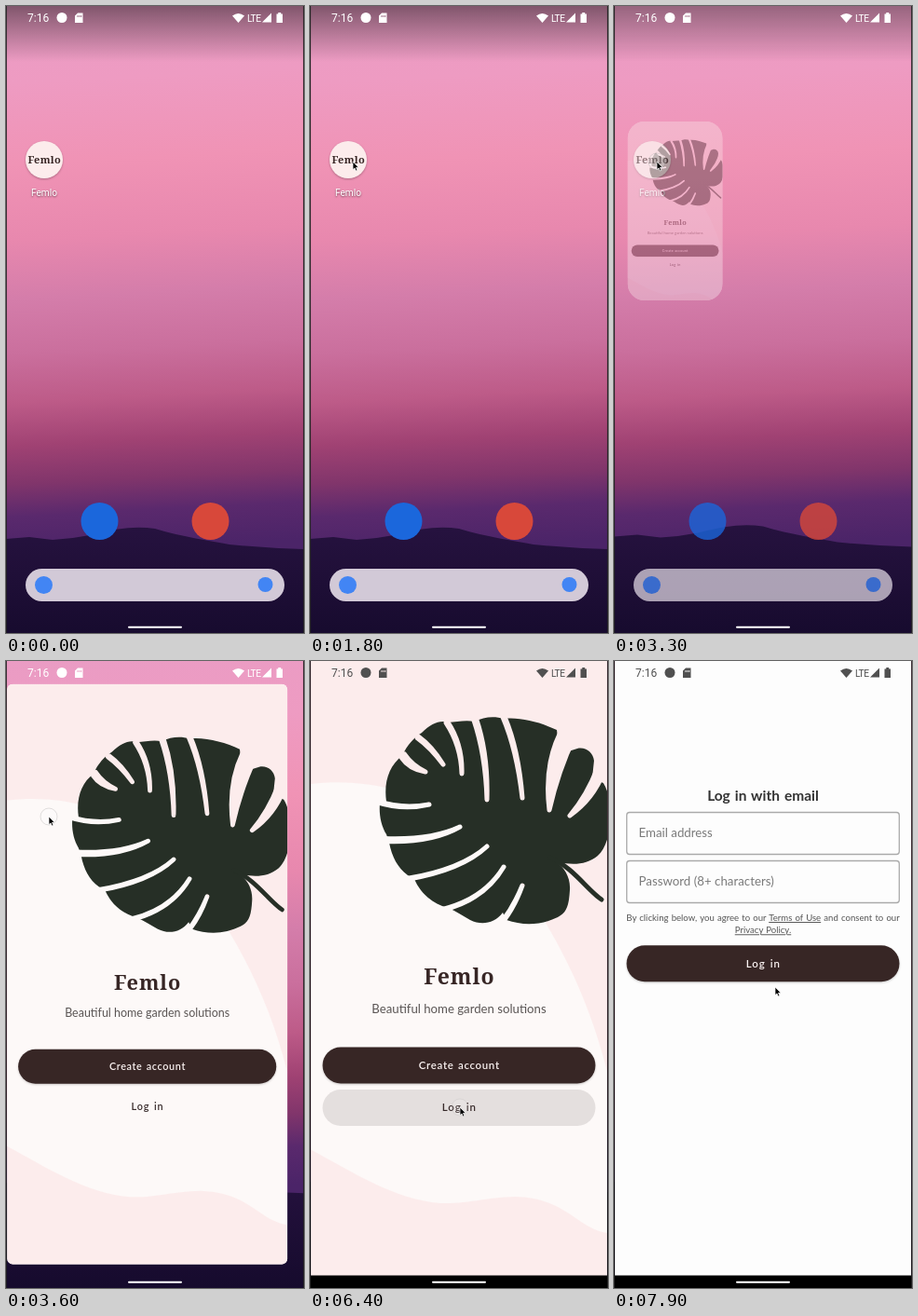
Animation, 320 px wide and 673 px high, one loop 8 s. Source, as an HTML page:

```html
<!DOCTYPE html>
<html lang="en">
<head>
<meta charset="utf-8">
<title>Garden app sign-in</title>
<style>
html, body { margin: 0; width: 100%; height: 100%; overflow: hidden; background: #000; }
svg { display: block; width: 100vw; height: 100vh; }
text { font-family: Lato, "Open Sans", sans-serif; }
.mid { text-anchor: middle; }
.brand { font-family: "Noto Serif", serif; font-weight: 600; fill: #372625; }
.sys { font-family: Roboto, sans-serif; }
.btn { fill: #372625; filter: drop-shadow(0 1px 1px #0003); }
.action { font-size: 11.5px; font-weight: 600; word-spacing: 1px; }
.light { fill: #fbf3f2; }
.field { fill: none; stroke: #aaa; stroke-width: 1.3; }
.hint { font-size: 13.3px; fill: #7a7a7a; }
.legal { font-size: 9.6px; fill: #555; word-spacing: .7px; }
.legal tspan { text-decoration: underline; }
</style>
</head>
<body>
<svg viewBox="0 0 320 673">
  <defs>
    <linearGradient id="sky" gradientUnits="userSpaceOnUse" x1="150" y1="0" x2="180" y2="580">
      <stop offset="0" stop-color="#ea9cc4"/>
      <stop offset=".13" stop-color="#ee9bc2"/>
      <stop offset=".28" stop-color="#f093b5"/>
      <stop offset=".42" stop-color="#e888ae"/>
      <stop offset=".53" stop-color="#d47daa"/>
      <stop offset=".63" stop-color="#ca6f9d"/>
      <stop offset=".72" stop-color="#bd5b88"/>
      <stop offset=".8" stop-color="#a04273"/>
      <stop offset=".87" stop-color="#81356b"/>
      <stop offset=".93" stop-color="#5a296d"/>
      <stop offset="1" stop-color="#4b2468"/>
    </linearGradient>
    <linearGradient id="hill" x1="0" y1="0" x2="0" y2="1">
      <stop offset="0" stop-color="#26123f"/>
      <stop offset="1" stop-color="#150a2c"/>
    </linearGradient>
    <linearGradient id="shade" x1="0" y1="0" x2="0" y2="1">
      <stop offset="0" stop-opacity=".45"/>
      <stop offset="1" stop-opacity="0"/>
    </linearGradient>
    <clipPath id="windowClip"><rect id="windowRect" x="1" y="0" width="318" height="660"/></clipPath>
    <clipPath id="pill"><rect x="13.5" y="460" width="293" height="39" rx="19.5"/></clipPath>
    <mask id="cuts" maskUnits="userSpaceOnUse" x="60" y="40" width="270" height="260">
      <rect x="60" y="40" width="270" height="260" fill="#fff"/>
      <path id="slits" stroke="#000" stroke-width="5" stroke-linejoin="round"/>
    </mask>
  </defs>

  <g id="wallpaper">
    <rect width="320" height="673" fill="url(#sky)"/>
    <path fill="url(#hill)" d="M0 572L25 570 50 573Q70 572 90 568C120 560 140 558 160 561C190 570 220 574 240 578Q280 582 320 583V690H0Z"/>
  </g>

  <g id="home">
    <rect width="320" height="60" fill="url(#shade)"/>
    <circle cx="41" cy="165" r="20" fill="#fcecec" style="filter:drop-shadow(0 1px 1px #0004)"/>
    <text class="brand mid" x="41.2" y="169" font-size="11" letter-spacing=".3">Femlo</text>
    <text class="sys mid" x="41" y="204" font-size="10.2" fill="#fff" style="text-shadow:0 1px 2px #0008">Femlo</text>
    <circle cx="100.5" cy="553" r="20" fill="#1b67dc"/>
    <circle cx="219.5" cy="553" r="20" fill="#d8483a"/>
    <rect x="21" y="604" width="278" height="35" rx="17.5" fill="#d2c9d7"/>
    <circle cx="40.5" cy="621.5" r="9.5" fill="#4285f4"/>
    <circle cx="278.5" cy="621" r="8" fill="#4285f4"/>
  </g>

  <g id="app">
    <g clip-path="url(#windowClip)">
      <rect width="320" height="660" fill="#fdfdfd"/>
      <g id="welcome">
        <rect width="320" height="660" fill="#fcecec"/>
        <path fill="#fdf9f8" d="M0 132C120 118 205 190 253 281C285 335 305 385 319 440V614C285 608 275 576 220 575C185 576 170 583 140 582C90 578 45 548 0 524Z"/>
        <path fill="#262f26" mask="url(#cuts)" d="M82 151C79 130 85 112 99 102C104 90 112 82 120 77C130 67 140 63 148 66C158 65 168 63 177 65C186 60 198 59 208 62C226 60 248 66 265 74L268 100 287 94C296 92 304 98 305 107L303 126 315 131C327 150 325 195 309 209C297 219 283 219 265 216C273 222 280 232 279 246C278 262 276 270 266 275C248 284 228 284 211 278L207 270C198 282 184 284 172 278C163 273 156 268 148 265C130 260 118 248 112 234L105 230C94 222 88 210 85 195L82 186C76 176 74 164 75 153Z"/>
        <path d="M258 211C283 222 298 246 313 256" fill="none" stroke="#262f26" stroke-width="5" stroke-linecap="round"/>
        <text class="brand mid" x="160.5" y="347" font-size="23" letter-spacing="1">Femlo</text>
        <text class="mid" x="160" y="377.5" font-size="13.2" fill="#5a5554">Beautiful home garden solutions</text>
        <rect class="btn" x="13.5" y="414.5" width="293" height="39" rx="19.5"/>
        <text class="action light mid" x="160.3" y="438" letter-spacing=".65">Create account</text>
        <circle id="ripple" cx="160" cy="479" clip-path="url(#pill)" fill="#372625" opacity=".12"/>
        <text class="action mid" x="160.4" y="483.3" letter-spacing="1" fill="#372a2a">Log in</text>
      </g>
      <g id="login">
        <text class="mid" x="160" y="149.5" font-size="15.5" font-weight="700" word-spacing="1.2" fill="#333">Log in with email</text>
        <rect class="field" x="13.7" y="162.5" width="292.6" height="45" rx="3"/>
        <text class="hint" x="26.5" y="189.3">Email address</text>
        <rect class="field" x="13.7" y="214.5" width="292.6" height="45" rx="3"/>
        <text class="hint" x="26.5" y="241.3">Password (8+ characters)</text>
        <text class="legal mid" x="160" y="279">By clicking below, you agree to our <tspan>Terms of Use</tspan> and consent to our</text>
        <text class="legal mid" x="160" y="292.3"><tspan>Privacy Policy.</tspan></text>
        <rect class="btn" x="13.5" y="305.3" width="293" height="39" rx="19.5"/>
        <text class="action light mid" x="160.4" y="328.6" letter-spacing="1">Log in</text>
      </g>
    </g>
  </g>

  <rect id="navBar" y="659.5" width="320" height="14"/>
  <rect x="131" y="665.7" width="58" height="2" rx="1" fill="#fff"/>
  <path d="M.5 0V673M319.5 0V673" stroke="#222" opacity=".85"/>

  <g id="status">
    <text class="sys" x="23" y="17" font-size="12">7:16</text>
    <circle cx="60" cy="12.5" r="5.5"/>
    <path fill-rule="evenodd" d="M77 7.5H82.5V18H74V10.5ZM76.5 10V12H77.4V10ZM78.4 10V12H79.3V10ZM80.3 10V12H81.2V10Z"/>
    <path d="M243 10.5Q249.5 5.5 256 10.5L249.5 18Z"/>
    <text class="sys" x="259" y="16.7" font-size="10.2" letter-spacing="-.5">LTE</text>
    <path d="M275 17.5L285 7.5V17.5ZM290.5 8.5H292.3V7H295.2V8.5H297V18H290.5Z"/>
  </g>

  <circle id="ring" r="9" fill="#fff" fill-opacity=".25" stroke="#888" stroke-opacity=".25"/>
  <path id="cursor" d="M0 0V8.6L2 6.9 3.4 10 4.9 9.3 3.5 6.3H6.2Z" stroke="#fff" stroke-width=".7"/>
</svg>
<script>
const LOOP = 8000, LAUNCH = 3250, LAUNCH_TIME = 500;
const $ = id => document.getElementById(id);
const set = (id, attrs) => { for (const k in attrs) $(id).setAttribute(k, attrs[k]); };
const span = (t, a, b) => Math.min(1, Math.max(0, (t - a) / (b - a)));
const smooth = u => u * u * (3 - 2 * u);
const easeOut = (from, to, u, power) => to + (from - to) * (1 - u) ** power;

// Leaf slits: opening, bend, inner end, opening width
const slits = [
  [100, 102, 108, 114, 124, 119, 5], [116, 82, 130, 92, 143, 111, 2],
  [147, 66, 163, 90, 163, 121, 2], [177, 62, 190, 100, 190, 149, 3],
  [208, 60, 223, 95, 228, 147, 2], [276, 80, 259, 115, 257, 160, 16],
  [312, 117, 301, 146, 279, 166, 8], [208, 278, 220, 262, 228, 241, 1],
  [142, 267, 187, 256, 208, 221, 1], [104, 234, 163, 224, 190, 199, 1],
  [80, 192, 130, 194, 161, 178, 3], [72, 151, 100, 160, 128, 154, 1]
];
const slit = ([x, y, bx, by, ex, ey, w]) => {
  const len = Math.hypot(ex - x, ey - y);
  const nx = (y - ey) / len * w / 2, ny = (ex - x) / len * w / 2;
  return `M${x + nx} ${y + ny}Q${bx + nx} ${by + ny} ${ex} ${ey}Q${bx - nx} ${by - ny} ${x - nx} ${y - ny}Z`;
};
set("slits", { d: slits.map(slit).join("") });

// Pointer stops: time, x, y
const stops = [
  [850, 322, 140], [1100, 67, 161], [1300, 67, 161], [1600, 46, 167],
  [4550, 46, 167], [4900, 126, 431], [5050, 126, 431], [5400, 161, 479],
  [7400, 161, 479], [7540, 245, 445], [7650, 284, 395], [7780, 235, 323], [7900, 173, 350]
];
function pointer(t) {
  const i = stops.findIndex(s => s[0] > t);
  if (i === 0) return [400, 140];
  if (i < 0) return stops.at(-1).slice(1);
  const [a, x, y] = stops[i - 1], [b, x2, y2] = stops[i];
  const u = smooth(span(t, a, b));
  return [x + (x2 - x) * u, y + (y2 - y) * u];
}

function launch(t) {
  const u = span(t, LAUNCH, LAUNCH + LAUNCH_TIME), open = u === 1;
  const left = easeOut(21, 1, u, 3.5), right = easeOut(61, 319, u, 2.25);
  const top = easeOut(145, 0, u, 1.46), bottom = easeOut(185, 660, u, 3);
  const scale = (right - left) / 318;
  set("app", {
    transform: `translate(${left - scale} ${top}) scale(${scale})`,
    opacity: span(u, 0, .3)
  });
  set("windowRect", { height: (bottom - top) / scale, rx: 20 * (1 - u) / scale });
  set("wallpaper", { transform: `translate(0 ${easeOut(0, -13, u, 2)})` });
  set("home", { opacity: 1 - span(u, 0, .5) });
  set("navBar", { opacity: +open });
  set("status", { fill: open ? "#505050" : "#fff" });
}

function draw() {
  const t = performance.now() % LOOP;
  launch(t);

  const fade = smooth(span(t, 6400, 7100));
  set("welcome", { opacity: 1 - fade });
  set("login", { opacity: fade });
  set("ripple", { r: 150 * smooth(span(t, 5980, 6280)) });

  const [x, y] = pointer(t);
  const press = (a, b) => span(t, a, a + 100) * (1 - span(t, b, b + 150));
  set("cursor", { transform: `translate(${x} ${y})` });
  set("ring", { cx: x, cy: y, opacity: Math.max(press(3150, 3620), .5 * press(5900, 6400)) });
  requestAnimationFrame(draw);
}
draw();
</script>
</body>
</html>
```
